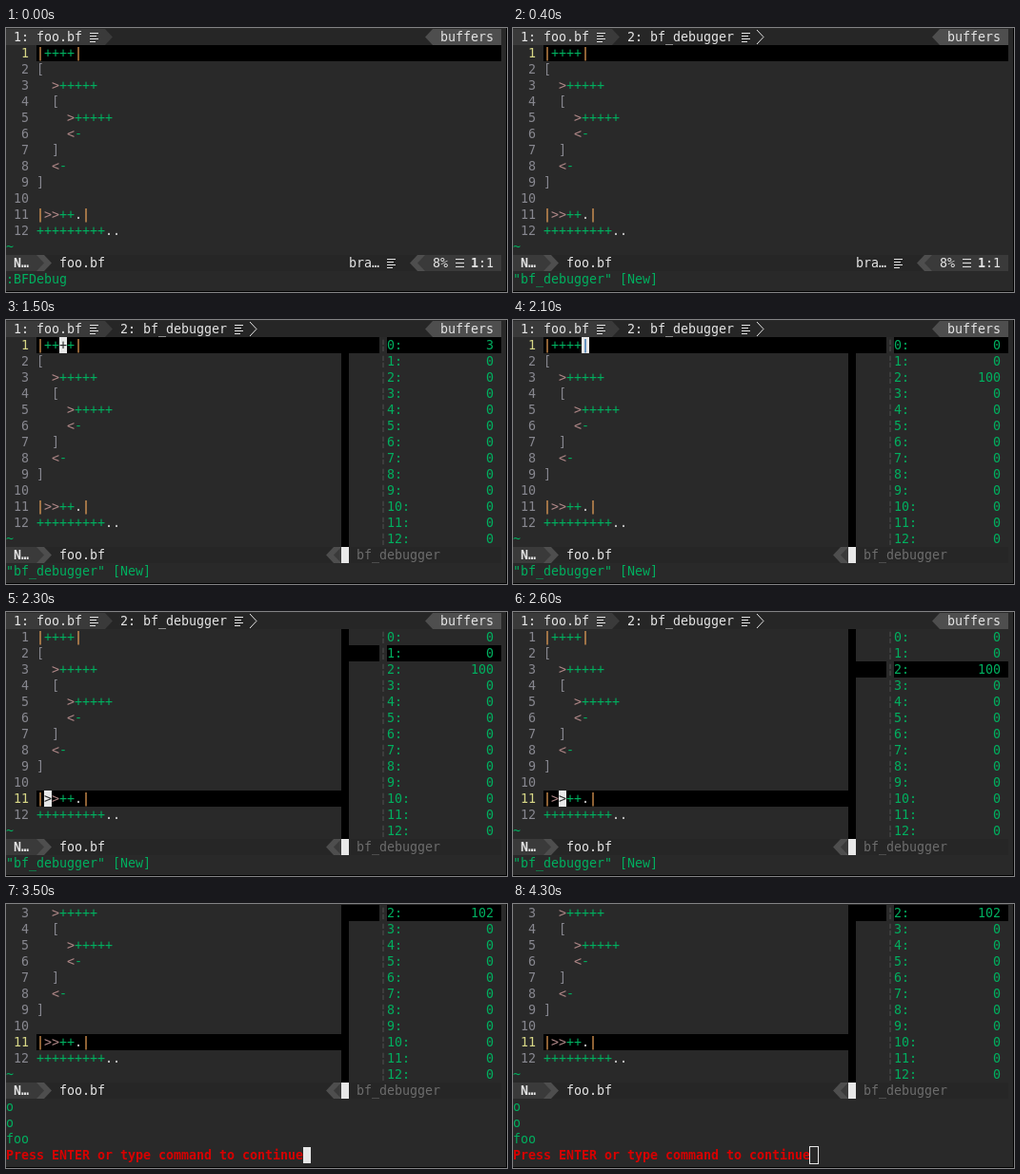
An HTML page with a canvas for the animation above (4500 ms loop, 526 px wide and 278 px high).

```html
<!DOCTYPE html>
<html lang="en">
<head>
<meta charset="utf-8">
<title>Debugger session</title>
<style>
  html, body { margin: 0; width: 100%; height: 100%; overflow: hidden; background: #292929; }
  canvas { display: block; }
</style>
</head>
<body>
<canvas id="screen" width="526" height="278"></canvas>
<script>
const ctx = document.getElementById('screen').getContext('2d');
const CW = 8, CH = 17, TOP = 1, LOOP = 4500;
const FONT = '13.333px "DejaVu Sans Mono", monospace';

const C = {
  bg: '#292929', bar: '#262626', seg: '#3a3a3a', seg2: '#4e4e4e', black: '#000',
  text: '#e4e4e4', dim: '#6c6c6c', num: '#87878f', curNum: '#d7d787',
  green: '#00af5f', red: '#d70000', cursor: '#e8e8e8', guide: '#4e4e4e'
};
const SYNTAX = {
  '+': C.green, '-': C.green, '>': '#af8787', '<': '#af8787',
  '[': '#87878f', ']': '#87878f', '|': '#ffaf5f', '.': '#d7d7d7'
};
const SOURCE = ['|++++|', '[', '  >+++++', '  [', '    >+++++', '    <-',
  '  ]', '  <-', ']', '', '|>>++.|', '+++++++++..'];

// Each step changes only the listed parts of the state.
const STEPS = [
  [0, { msg: ':BFDebug', line: 1, col: -1, ptr: 0, first: 0, third: 0 }],
  [400, { msg: '"bf_debugger" [New]', tabs: true }],
  [800, { split: true, col: 0 }],
  [1000, { col: 1, first: 1 }],
  [1200, { col: 2 }],
  [1300, { first: 2 }],
  [1500, { col: 3, first: 3 }],
  [1700, { col: 4 }],
  [1800, { first: 4 }],
  [2000, { col: 5 }],
  [2100, { first: 0, third: 100 }],
  [2300, { line: 11, col: 1, ptr: 1 }],
  [2600, { col: 2, ptr: 2 }],
  [2800, { col: 3 }],
  [2900, { third: 101 }],
  [3100, { col: 4, third: 102 }],
  [3300, { col: 5, msg: 'f' }],
  [3500, { col: -1, prompt: 'block' }],
  [4100, { prompt: 'off' }],
  [4300, { prompt: 'outline' }]
];

let scroll = 0;
const yOf = row => TOP + (row - scroll) * CH;

function fill(col, row, n, color) {
  if (row < scroll) return;
  ctx.fillStyle = color;
  ctx.fillRect(col * CW, yOf(row), n * CW, CH);
}

function text(col, row, str, color, bold) {
  if (row < scroll) return;
  ctx.font = (bold ? 'bold ' : '') + FONT;
  ctx.fillStyle = color;
  [...str].forEach((ch, i) => {
    if (ch !== ' ') ctx.fillText(ch, (col + i) * CW, yOf(row) + 13);
  });
}

// Powerline separator; dir 1 points right, -1 points left.
function arrow(col, row, dir, color, back, thin) {
  fill(col, row, 1, back);
  const y = yOf(row), x = col * CW + (dir > 0 ? 0 : CW);
  ctx.beginPath();
  ctx.moveTo(x, y + (thin ? 1 : 0));
  ctx.lineTo(x + dir * (thin ? 7 : 8), y + CH / 2);
  ctx.lineTo(x, y + CH - (thin ? 1 : 0));
  ctx.fillStyle = ctx.strokeStyle = color;
  ctx.lineWidth = 1;
  if (thin) ctx.stroke(); else ctx.fill();
}

function lines(col, row, widths, top, gap) {
  ctx.fillStyle = C.text;
  widths.forEach((w, i) => ctx.fillRect(col * CW, yOf(row) + top + i * gap, w, 1));
}
const fileIcon = (col, row) => lines(col, row, [9, 7, 9, 6], 4, 3);

function tabLine(s) {
  fill(0, 0, 65, C.bar);
  fill(0, 0, 13, C.seg);
  text(1, 0, '1: foo.bf', C.text);
  fileIcon(11, 0);
  arrow(13, 0, 1, C.seg, C.bar);
  if (s.tabs) {
    text(15, 0, '2: bf_debugger', C.text);
    fileIcon(30, 0);
    arrow(32, 0, 1, C.text, C.bar, true);
  }
  arrow(55, 0, -1, C.seg2, C.bar);
  fill(56, 0, 9, C.seg2);
  text(57, 0, 'buffers', C.text);
}

function editor(s) {
  fill(4, s.line, s.split ? 40 : 61, C.black);
  SOURCE.forEach((code, i) => {
    const n = i + 1;
    text(0, n, String(n).padStart(3), n === s.line ? C.curNum : C.num);
    [...code].forEach((ch, j) => text(4 + j, n, ch, SYNTAX[ch]));
  });
  text(0, 13, '~', C.green);
  if (s.col >= 0) {
    const ch = SOURCE[s.line - 1][s.col];
    fill(4 + s.col, s.line, 1, C.cursor);
    text(4 + s.col, s.line, ch, ch === '|' ? '#0050a0' : C.bg);
  }
}

function memory(s) {
  for (let r = 1; r < 14; r++) fill(44, r, 1, C.black);
  fill(45, s.ptr + 1, 20, C.black);
  for (let i = 0; i < 13; i++) {
    const value = i === 0 ? s.first : i === 2 ? s.third : 0;
    fill(49, i + 1, 1, C.bg);
    text(49, i + 1, '¦', C.guide);
    text(50, i + 1, i + ':', C.green);
    text(50, i + 1, String(value).padStart(14), C.green);
  }
}

function statusLine(s) {
  const row = 14;
  fill(0, row, 65, C.bar);
  fill(0, row, 4, C.seg);
  text(1, row, 'N…', C.text, true);
  arrow(4, row, 1, C.seg, C.seg2);
  arrow(5, row, 1, C.seg2, C.bar);
  text(7, row, 'foo.bf', C.text);
  const end = s.split ? 42 : 53;
  arrow(end, row, -1, C.seg2, C.bar);
  arrow(end + 1, row, -1, C.seg, C.seg2);
  if (s.split) {
    fill(44, row, 1, C.cursor);
    text(46, row, 'bf_debugger', C.dim);
  } else {
    text(45, row, 'bra…', C.text);
    fileIcon(50, row);
    fill(55, row, 10, C.seg);
    text(56, row, '8%', C.text);
    lines(59, row, [9, 9, 9], 4, 4);
    text(61, row, '1', C.text, true);
    text(62, row, ':1', C.text);
  }
}

function prompt(mode) {
  ['o', 'o', 'foo'].forEach((out, i) => text(0, 15 + i, out, C.green));
  text(0, 18, 'Press ENTER or type command to continue', C.red, true);
  if (mode === 'block') fill(39, 18, 1, C.cursor);
  if (mode === 'outline') {
    ctx.strokeStyle = C.cursor;
    ctx.lineWidth = 1;
    ctx.strokeRect(311.5, 255.5, 9, 18);
  }
}

function draw(s) {
  scroll = s.prompt ? 3 : 0;
  ctx.fillStyle = C.bg;
  ctx.fillRect(0, 0, 526, 278);
  if (!s.prompt) tabLine(s);
  editor(s);
  if (s.split) memory(s);
  statusLine(s);
  if (s.prompt) prompt(s.prompt);
  else text(0, 15, s.msg, C.green);
  ctx.fillStyle = C.black;
  ctx.fillRect(525, 0, 1, 278);
  ctx.fillRect(0, 277, 526, 1);
}

const start = performance.now();
let shown = 0;
function tick() {
  const t = (performance.now() - start) % LOOP;
  const past = STEPS.filter(([at]) => at <= t);
  if (past.length !== shown) {
    shown = past.length;
    draw(Object.assign({}, ...past.map(([, change]) => change)));
  }
  requestAnimationFrame(tick);
}
tick();
</script>
</body>
</html>
```
